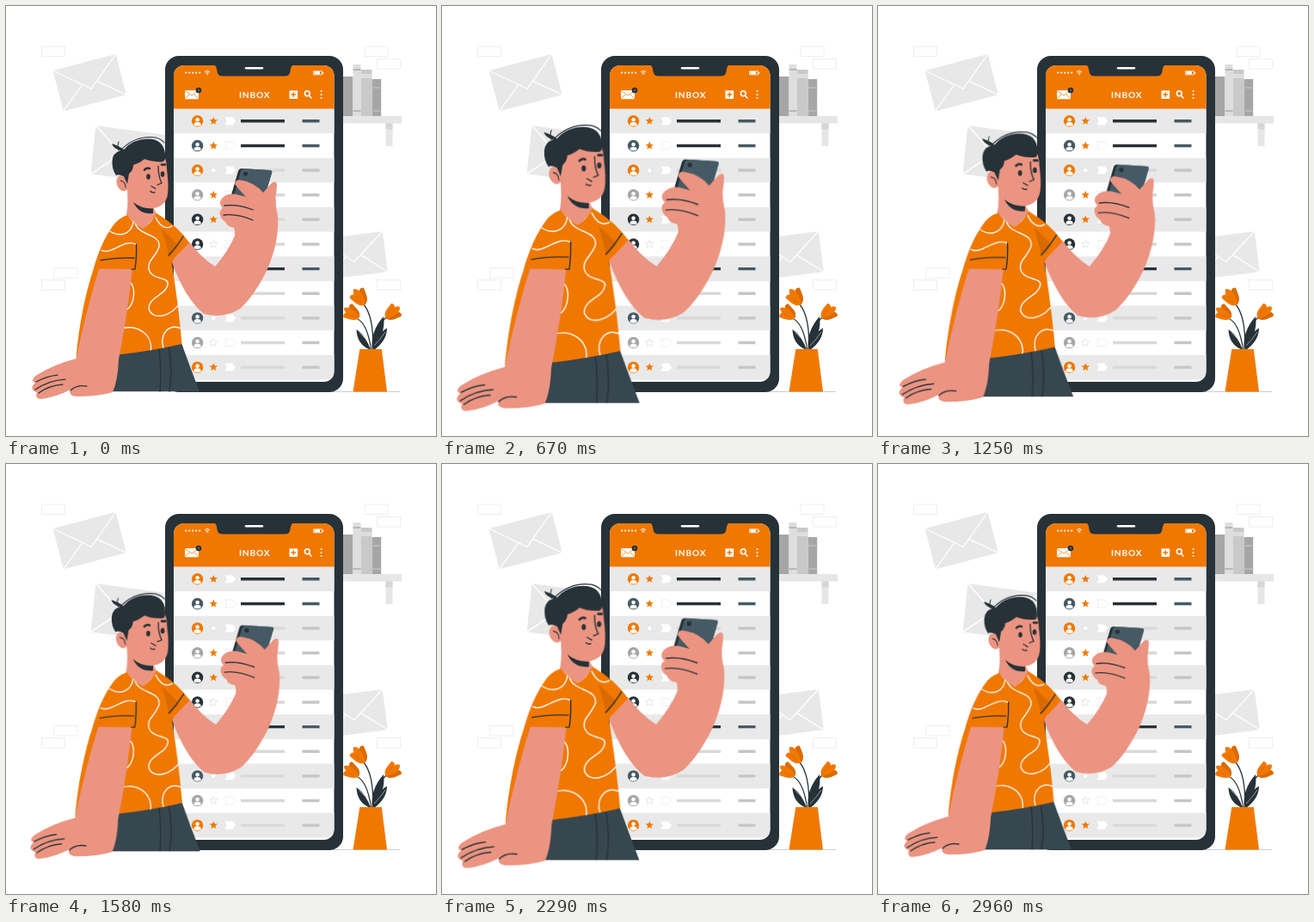
Recreate the animation shown at these times as an HTML page. Size 500 by 500 pixels, loop 3000 ms.

```html
<!DOCTYPE html>
<html lang="en">
<head>
<meta charset="utf-8">
<title>Inbox</title>
<style>
  html, body { margin: 0; width: 100%; height: 100%; overflow: hidden; background: #fff; }
  svg { display: block; width: 100vw; height: 100vh; }
  #person { transform-origin: 173.5px 305px; }
  .dark { fill: #263238; }
  .orange { fill: #f07800; }
  .deep { fill: #d96a00; }
  .skin { fill: #eb9481; }
  .pale { fill: #e8e8e8; }
  .line { fill: none; stroke: #263238; stroke-width: 1.3; stroke-linecap: round; stroke-linejoin: round; }
  .white { fill: none; stroke: #fff; stroke-width: 1.3; stroke-linecap: round; stroke-linejoin: round; }
  .brick { fill: none; stroke: #ececec; stroke-width: .8; }
  text { font: 700 10.2px Lato, "Open Sans", sans-serif; letter-spacing: .8px; fill: #fff; }
</style>
</head>
<body>
<svg viewBox="0 0 500 500">
  <defs>
    <clipPath id="screen"><rect x="195" y="69" width="186.5" height="368" rx="12"/></clipPath>
    <clipPath id="shirtClip">
      <path id="shirt" d="M141 243Q130 247 124 256C114 270 107 288 102 305Q87 350 81.500 408L134 405Q170 401 204.500 393C202 362 197 326 192.500 297L213 275Q200 256 175 241Q168 254 159 259Q148 253 141 243Z"/>
    </clipPath>
    <g id="envelope">
      <path class="pale" d="M0 0H76V49H0Z"/>
      <path class="white" d="M0 0L38 32L76 0M0 49L29 25M76 49L47 25"/>
    </g>
    <g id="flower">
      <path class="orange" d="M0 11C-8 9 -8 1 -10 -6Q-6 -9 -3.500 -6Q-3 -10 0 -11.500Q3 -10 4 -6Q7 -9 10 -6C8 1 8 9 0 11Z"/>
      <path class="deep" d="M4 -6Q7 -9 10 -6C8 1 8 9 0 11Q5 4 4 -6ZM-3.500 -6Q-4 3 0 8Q-6 3 -3.500 -6Z"/>
    </g>
  </defs>

  <g id="bricks" class="brick"></g>

  <use href="#envelope" transform="matrix(.962 -.25 .25 .962 54.500 75)"/>
  <use href="#envelope" transform="matrix(1.1 .148 -.12 1.15 104.500 139)"/>
  <use href="#envelope" transform="matrix(.97 -.125 .125 .96 364 271.500)"/>

  <g id="shelf">
    <path fill="#a6a6a6" d="M385 82h18.500v46H385ZM425.500 85h10.700v43h-10.700Z"/>
    <path fill="#dedede" d="M403.500 68h9v60h-9Z"/>
    <path fill="#c9c9c9" d="M412.500 74h13v54h-13Z"/>
    <path fill="#b8b8b8" d="M403.500 73h9v2h-9ZM403.500 121h9v2h-9ZM425.500 94h10.700v2h-10.700ZM425.500 121h10.700v2h-10.700Z"/>
    <path fill="#dedede" d="M412.500 79h13v5h-13Z"/>
    <path fill="#e6e6e6" d="M385 128h75v8.500h-75ZM441.500 136h8v27h-8Z"/>
    <path fill="#d6d6d6" d="M441.500 136.500h8v7h-8Z"/>
  </g>

  <path d="M380 448.500H458" stroke="#b5babd" stroke-width=".7"/>

  <g id="plant">
    <path class="dark" d="M424 400Q408 394 407.500 376Q419 384 424 400ZM428 400Q428 384 443 374.500Q443 389 428 400Z"/>
    <path class="dark" d="M426 400Q423 379 439 361Q442 381 426 400Z"/>
    <path class="line" d="M424.500 399Q420 368 407 363M426.500 399Q428 362 416 347M428 399Q429 374 442 362"/>
    <path d="M424 396Q419 386 411 380M428 395Q435 388 441 379" fill="none" stroke="#fff" stroke-width=".5"/>
    <use href="#flower" transform="translate(411 338.500) rotate(-35)"/>
    <use href="#flower" transform="translate(402 357) rotate(-58) scale(.93)"/>
    <use href="#flower" transform="translate(449.500 356.500) rotate(52) scale(.93)"/>
    <path class="orange" d="M411.300 399h25.500L443 448.500h-39.500Z"/>
  </g>

  <rect class="dark" x="185" y="58" width="207" height="391" rx="16"/>
  <g clip-path="url(#screen)">
    <path fill="#fff" d="M195 69h187v369H195Z"/>
    <g id="rows"></g>
    <path class="orange" d="M195 69h187v50.500H195Z"/>
    <path class="dark" d="M242 68Q245 70 245.500 76Q246 81.500 252 81.500H324Q330 81.500 330.500 76Q331 70 334 68Z"/>
  </g>
  <path class="white" style="stroke-width:2.4" d="M279 72.300H298"/>
  <g id="status" fill="#fff"></g>
  <path class="white" style="stroke-width:1" d="M231.300 76.400Q234 74 236.700 76.400M232.600 78Q234 76.800 235.400 78"/>
  <circle cx="234" cy="79.300" r=".7" fill="#fff"/>
  <path class="white" style="stroke-width:.8" d="M358 75.800h9.500v4h-9.500Z"/>
  <path fill="#fff" d="M358.500 76h6.500v3.600h-6.500ZM368 76.800h1.200v2h-1.200Z"/>
  <path fill="#fff" d="M208 98h16v10.300h-16Z"/>
  <path d="M208 98.300L216 104L224 98.300M208 108L213.500 102.500M224 108L218.500 102.500" fill="none" stroke="#f07800" stroke-width=".7"/>
  <circle class="dark" cx="224" cy="98" r="3.300"/>
  <path d="M224 96.800v2.400" stroke="#fff" stroke-width=".5"/>
  <text x="289.200" y="106.700" text-anchor="middle">INBOX</text>
  <path fill="#fff" d="M329.500 98.300h9.600v9.600h-9.600Z"/>
  <path d="M334.300 100.300v5.600M331.500 103.100h5.600" stroke="#f07800" stroke-width="1.500"/>
  <g class="white" style="stroke-width:1.600"><circle cx="350.300" cy="101.800" r="2.900"/><path d="M352.500 104.200L355 107"/></g>

  <g id="person">
    <path fill="#37474f" d="M128 404L204 392Q214 420 225 448.300H122Z"/>
    <path class="line" d="M178 399Q181 424 179 448M189.500 397Q194 425 190 448"/>

    <!-- raised arm -->
    <path class="skin" d="M213 274Q226 292 243 303Q258 286 267 265L285 232L303 214Q309 203 313.500 205Q316 207 313.500 222Q313 233 316 244Q318 274 303 308Q288 338 272 352Q253 364 230 358Q208 340 192.500 297Z"/>
    <path class="dark" d="M270 192Q271 189 274 189L307 191Q310 191.500 309 194L301 221Q299 224 296 224H263.500Q261 224 261.500 221Z"/>
    <path fill="#455a64" d="M273 192Q274 189.200 277 189.300L307 191Q310 191.500 309 194L301 221Q299 224 296 224H267Q264 224 264.500 221Z"/>
    <circle class="dark" cx="278.500" cy="195" r="2.500"/>
    <path class="skin" d="M266 207Q267 201 273 202.500Q289 205 299 217L308 207Q314 201 315 208L309 244L280 275L263 277Q268 268 265 258Q256 256 255 251Q249 247 248.500 241Q248.500 237 252 235Q247 230 250 225Q256 217 268 219L279 222Q271 214 266 207Z"/>
    <path class="line" d="M254 232Q269 230 287 237M253 243Q268 241 287 249"/>

    <!-- neck and shirt -->
    <path class="skin" d="M140 204Q143 229 140 243L159 261L176 242Q171 237 171 228Z"/>
    <use href="#shirt" class="orange"/>
    <path class="deep" d="M181 259Q186 276 190 292L201 279Z"/>
    <g clip-path="url(#shirtClip)" class="white">
      <path d="M150 252C154 268 180 264 178 280C174 292 164 296 166 306C170 320 190 314 188 324C186 336 166 338 166 352C170 366 192 362 203 344"/>
      <path d="M174 246Q182 262 193 256M139 318Q151 322 148 340Q146 350 139 354"/>
      <path d="M132 376C151 368 172 382 168 402M183 398C178 380 190 369 204 375"/>
    </g>

    <!-- resting arm -->
    <path class="skin" d="M109 303Q94 350 81.500 410Q55 417 36 429Q29 434 32 437L34 438Q28 444 32 447Q34 449 36 449Q33 456 40 457Q58 455 75 446Q72 453 82 454Q108 454 124 449Q130 436 131 411Q142 355 147 304Z"/>
    <path class="line" d="M35 437Q48 430 60 429M34 446Q50 435 69 434M38 450Q50 441 66 440M75 447Q82 440 94 442"/>
    <path class="orange" d="M128 252C114 268 107 288 102 305.500L149 306L153 278L145 262Z"/>
    <path class="white" d="M121 262C134 270 146 264 148 251M111 284C122 290 138 270 151 277"/>
    <path class="line" d="M110 295.500Q128 292 149 293M151.500 277Q152 293 150 306H146M189 290Q197 282 206 268"/>

    <!-- head -->
    <ellipse class="skin" cx="135.500" cy="206" rx="6.800" ry="9.500" transform="rotate(-18 135.500 206)"/>
    <path class="skin" d="M140 186Q151 171 181 172Q187 176 187 190Q190 214 187 223Q184 233 172 235Q156 235 147 226Q138 215 140 186Z"/>
    <path class="dark" d="M148 228Q157 236 171 235.500V241Q155 243 148 228Z"/>
    <path class="dark" d="M141 207L137 198Q131 195 128 197Q123 190 123.500 180Q124 171 133 168Q125 166 123 160Q132 163 137 167Q147 155 164 154.500Q183 154 185 172Q186 180 182 181Q171 182 161 178Q155 183 148 185Q148 191 143 195Z"/>
    <path class="line" style="stroke-width:1" d="M131 168Q129 164 131 158M134 167Q151 150 174 153Q181 155 184 159M133 203Q139 204 139 211"/>
    <path class="line" style="stroke-width:2.600" d="M161 190.500Q164 187.500 167 189M181 184.500L185 184.500"/>
    <ellipse class="dark" cx="165.500" cy="198.500" rx="2.300" ry="3.200"/>
    <ellipse class="dark" cx="182" cy="195.500" rx="2.300" ry="3.200"/>
    <path class="line" d="M177 186Q177 198 181 206L176 208M169 209.500L174 212.500M168 215.500Q170 217.500 173 216.500"/>
  </g>
</svg>
<script>
const el = (id) => document.getElementById(id);
const orange = "#f07800", dark = "#263238", slate = "#455a64", grey = "#a6a6a6";

el("bricks").innerHTML = [[41.5, 47], [417, 47], [431.5, 61.5], [56, 304.5], [41.5, 318.5], [431.5, 318.5]]
  .map(([x, y]) => `<rect x="${x}" y="${y}" width="27" height="11.500"/>`).join("");

const dot = (x, y, r) => `<circle cx="${x}" cy="${y}" r="${r}"/>`;
el("status").innerHTML = [0, 1, 2, 3, 4].map(i => dot(209.2 + i * 4, 77.6, 1.1)).join("")
  + [99, 103, 107].map(y => dot(366.5, y, 1)).join("");

const starPath = Array.from({ length: 10 }, (_, i) => {
  const a = i * Math.PI / 5 - Math.PI / 2, r = i % 2 ? 2.2 : 4.9;
  return `${(241.3 + r * Math.cos(a)).toFixed(2)} ${(r * Math.sin(a)).toFixed(2)}`;
}).join("L");

const avatars = [orange, slate, orange, grey, dark, dark, orange, grey, slate, grey, orange];
const starred = [0, 1, 3, 4, 10], unread = [0, 1, 6];

function row(color, i) {
  const shaded = i % 2 === 0, bold = unread.includes(i);
  const star = starred.includes(i) ? `fill="${orange}"` : `fill="#fff" stroke="#e0e0e0" stroke-width=".8"`;
  const tag = shaded ? `fill="#fff"` : `fill="#fff" stroke="#ececec" stroke-width=".8"`;
  return `<g transform="translate(0 ${133.8 + i * 28.63})">
    ${shaded ? `<path fill="#e9e9e9" d="M195 -14.300h187v28.600H195Z"/>` : ""}
    <circle cx="222.600" r="6.700" fill="${color}"/>
    <circle cx="222.600" cy="-1.500" r="2.300" fill="#fff"/>
    <path d="M218.300 4.600Q218.600 1.200 222.600 1.200T226.900 4.600Q222.600 7 218.300 4.600Z" fill="#fff"/>
    <path d="M${starPath}Z" ${star}/>
    <path d="M254.500 -4.500H263.500L267 0L263.500 4.500H254.500L257 0Z" ${tag}/>
    <path d="M273 0H324" stroke="${bold ? dark : "#d9d9d9"}" stroke-width="3.400"/>
    <path d="M344.500 0H364.500" stroke="${bold ? slate : "#c6c6c6"}" stroke-width="3.400"/>
  </g>`;
}
el("rows").innerHTML = avatars.map(row).join("");

// time in ms, scale
const beat = [[0, 1], [590, 1.1], [960, 1.065], [1580, 1.014], [1780, 1], [2370, 1.098], [2960, 1], [3000, 1]];
el("person").animate(
  beat.map(([t, s]) => ({ offset: t / 3000, transform: `scale(${s})` })),
  { duration: 3000, iterations: Infinity }
);
</script>
</body>
</html>
```
